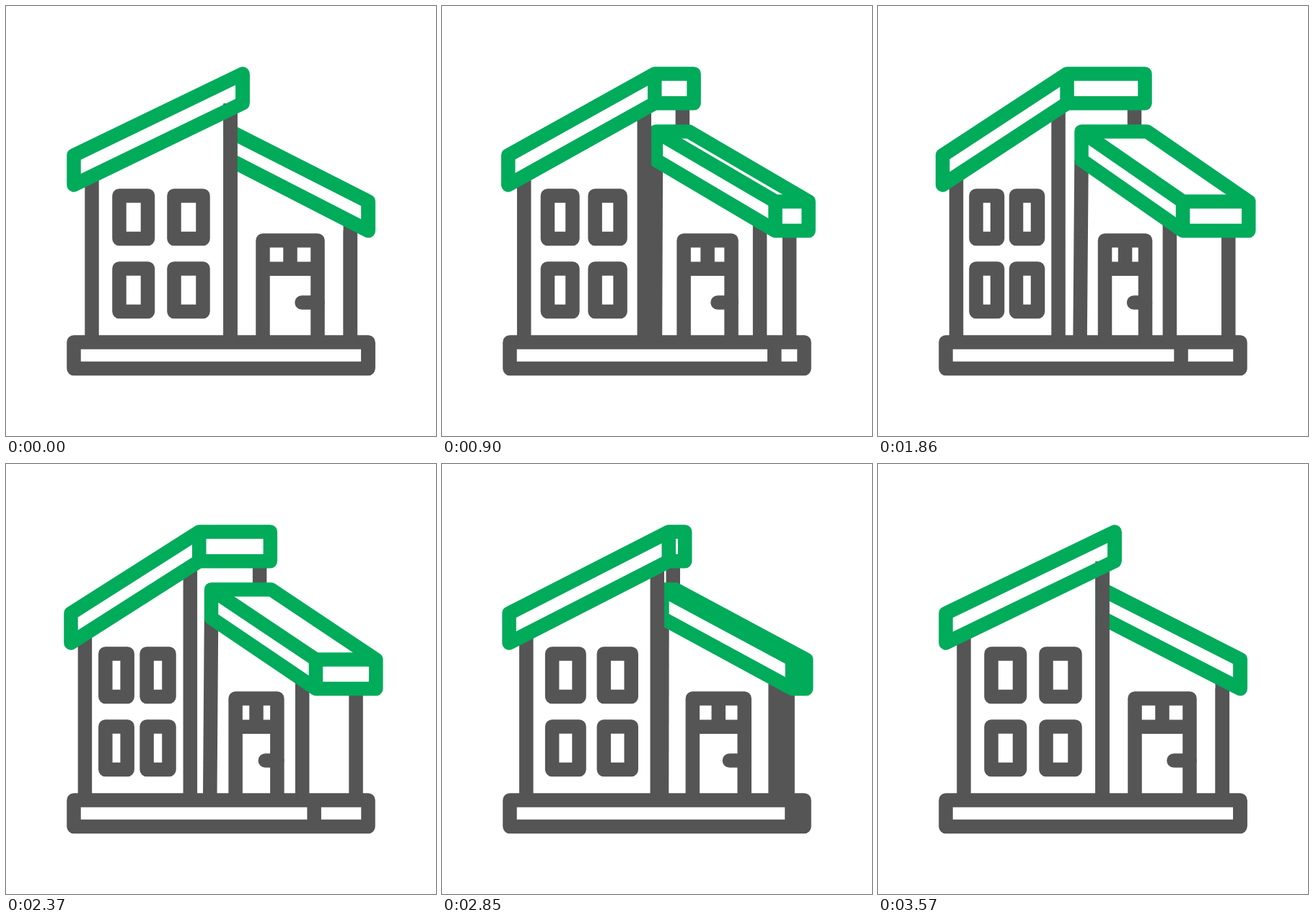
These frames come from a looping animation (596 by 596 pixels, 3600 ms). An HTML page with a canvas:

```html
<!DOCTYPE html>
<html lang="en">
<head>
<meta charset="utf-8">
<title>House turning</title>
<style>
  html, body { margin: 0; width: 100%; height: 100%; overflow: hidden; background: #fff; }
  canvas { display: block; }
</style>
</head>
<body>
<canvas id="stage" width="596" height="596"></canvas>
<script>
const ctx = document.getElementById('stage').getContext('2d');
const GRAY = '#555555', GREEN = '#00ab5a';
const PERIOD = 3600, EASE = 0.81;

// Symmetric cubic Bezier easing (EASE, 0, 1 - EASE, 1), solved by bisection.
function ease(u) {
  let lo = 0, hi = 1;
  for (let i = 0; i < 30; i++) {
    const s = (lo + hi) / 2, r = 1 - s;
    const x = 3 * EASE * s * r * r + 3 * (1 - EASE) * s * s * r + s * s * s;
    if (x < u) lo = s; else hi = s;
  }
  return lo * lo * (3 - 2 * lo);
}

function stroke(points, closed, cap = 'butt') {
  ctx.beginPath();
  points.forEach(([x, y]) => ctx.lineTo(x, y));
  if (closed) ctx.closePath();
  ctx.lineCap = cap;
  ctx.stroke();
}
const box = (x1, y1, x2, y2) => stroke([[x1, y1], [x2, y1], [x2, y2], [x1, y2]], true);
const post = (x, y1, y2 = 466) => stroke([[x, y1], [x, y2]]);

function draw(p) {
  const at = (front, turn) => front + turn * p;
  ctx.fillStyle = '#fff';
  ctx.fillRect(0, 0, 596, 596);
  ctx.lineWidth = 19.5;
  ctx.lineJoin = 'round';

  // Base
  ctx.strokeStyle = GRAY;
  box(94, 466, 502, 502.5);
  post(at(502, -82), 466, 502.5);

  // Posts behind the roofs
  post(at(311, 44.5), 135, 174);
  stroke([[at(311, -29), 214], [at(311, -31), 466]]);
  post(at(477.3, -73), 297);
  post(at(477.3, 8.5), 311);
  post(at(119, -10.5), 236);

  // Windows
  for (const y of [263, 364]) {
    box(at(157, -21), y, at(196.5, -31), y + 59.5);
    box(at(233, -41.5), y, at(273, -51.5), y + 59.5);
  }

  // Door
  const left = at(356, -41.5), right = at(432, -61.5);
  stroke([[left, 466], [left, 325], [right, 325], [right, 466]]);
  stroke([[left, 364.3], [right, 364.3]]);
  post(at(394, -51.5), 325, 364);
  stroke([[at(410, -55.5), 411], [right, 411]], false, 'round');

  // Right roof: top face, then front face
  ctx.strokeStyle = GREEN;
  const ridge = at(311, -29), eave = at(502, -79.5), farEave = at(502.3, 11.5);
  stroke([[ridge, 174], [at(311, 62), 174], [farEave, 271], [farEave, 311.5],
          [eave, 311.5], [ridge, 213.5]], true);
  stroke([[ridge, 174], [eave, 271], [farEave, 271]]);
  post(eave, 271, 311.5);

  // Tall front post overlaps the right roof
  ctx.strokeStyle = GRAY;
  post(at(311, -61), 142);

  // Left roof
  ctx.strokeStyle = GREEN;
  const low = at(94, -4.4), peak = at(328, -66), farPeak = at(328, 42);
  stroke([[low, 207], [peak, 94], [farPeak, 94], [farPeak, 134.8],
          [peak, 134.8], [low, 248]], true);
  post(peak, 94, 134.8);
}

function tick() {
  const t = performance.now() % PERIOD;
  draw(ease(1 - Math.abs(2 * t / PERIOD - 1)));
  requestAnimationFrame(tick);
}
tick();
</script>
</body>
</html>
```
